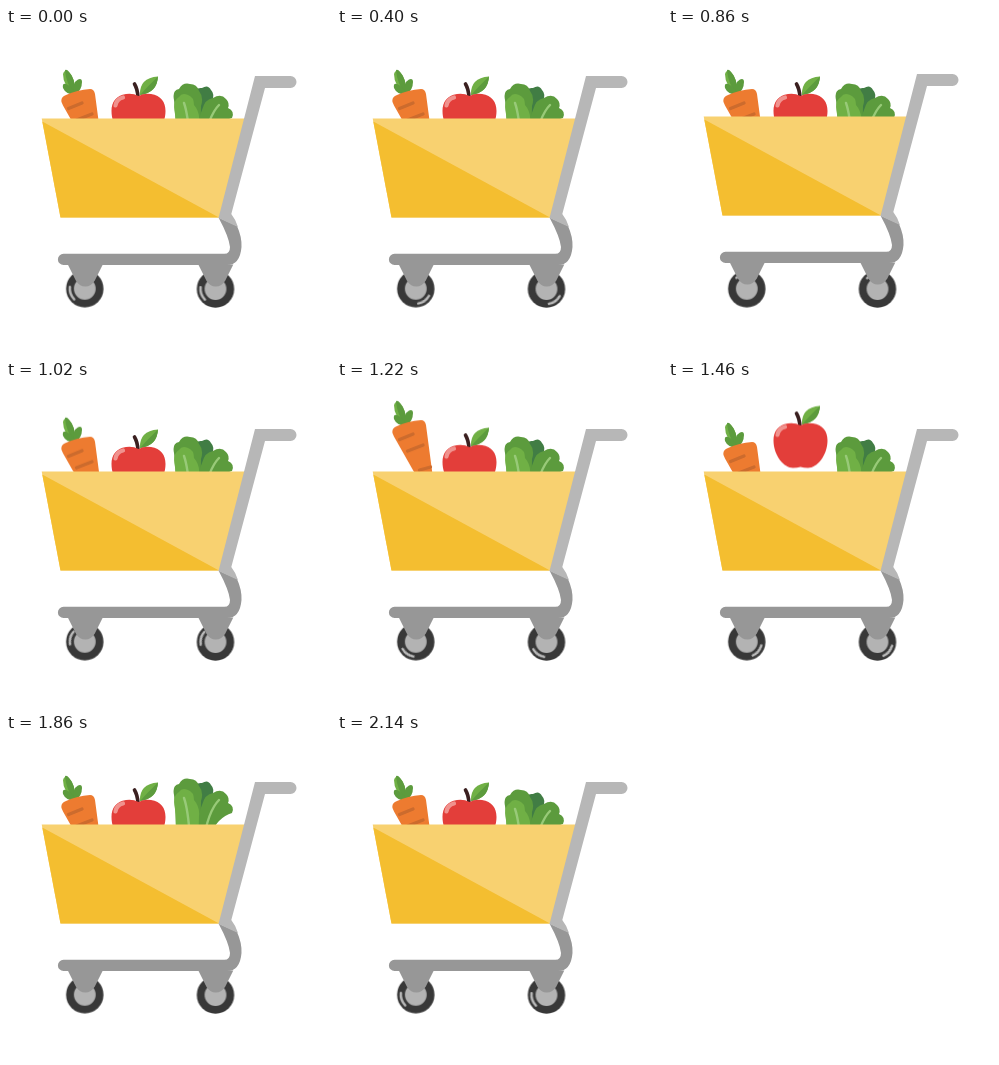
Recreate the animation shown at these times as an HTML page. Size 325 by 325 pixels, loop 2.48 s.

```html
<!DOCTYPE html>
<html lang="en">
<head>
<meta charset="utf-8">
<title>Grocery cart</title>
<style>
html, body { margin: 0; width: 100%; height: 100%; overflow: hidden; background: #fff; }
svg { display: block; width: 100vw; height: 100vh; }
.cart, .carrot, .apple, .lettuce { animation: 2480ms cubic-bezier(.37, 0, .63, 1) infinite; }
.cart { animation-name: bump; }
.carrot { animation-name: carrot; }
.apple { animation-name: apple; }
.lettuce { animation-name: lettuce; }
.spin { animation: spin 2480ms linear infinite; }
.light { fill: #70b045; }
.mid { fill: #5c9b3d; }
.dark { fill: #417d44; }
.line { fill: none; stroke-linecap: round; }
.vein { stroke: #98ca78; stroke-width: 2.4; }
.shine { stroke: #b9b9b9; stroke-width: 2.5; }
@keyframes bump {
  0%, 29.8%, 39.5%, 100% { transform: none; }
  34.7% { transform: translateY(-2px); }
}
@keyframes carrot {
  0%, 38.8%, 55%, 100% { transform: none; }
  46.9% { transform: translateY(-27px); }
}
@keyframes apple {
  0%, 48%, 64.1%, 100% { transform: none; }
  56% { transform: translateY(-33px); }
}
@keyframes lettuce {
  0%, 62.4%, 78.5%, 100% { transform: none; }
  70.5% { transform: translateY(-28px); }
}
/* speeds up briefly, then two even turns */
@keyframes spin {
  0% { transform: rotate(0deg); animation-timing-function: cubic-bezier(.33, 0, .67, .33); }
  8.06% { transform: rotate(-35.3deg); }
  86.29%, 100% { transform: rotate(-720deg); }
}
</style>
</head>
<body>
<svg viewBox="0 0 325 325">
  <defs>
    <g id="wheel">
      <circle r="18.7" fill="#383838"/>
      <circle r="10.9" fill="#b3b3b3"/>
    </g>
    <path id="shine" class="line shine" d="M-14.9 -1.8A15 15 0 0 0 -10.6 10.6"/>
    <path id="fork" d="M-17.500 -25H17.500L9.500 -9Q6 -3 0 -3Q-6 -3 -9.500 -9Z" fill="#979797"/>
  </defs>

  <g class="carrot">
    <path class="light" d="M69 67Q57 58 57 46Q59 40 63 44Q70 51 69 67Z"/>
    <path class="mid" d="M69 67Q60 56 59 42Q61 41 63 44Q70 51 69 67Z"/>
    <path class="mid" d="M69 67Q65 55 72 51.500Q76 50 76 54Q76 62 69 67Z"/>
    <path class="mid" d="M70 67Q60 67 57 60Q56 55 60 56Q67 59 70 67Z"/>
    <path d="M55.500 74Q54.500 69 60 67Q71 62 84 61Q88 61 89 66L98 134Q98 140 89 134L57 77.500Z" fill="#ed7b30"/>
    <path class="line" d="M62.500 80.500L76 75M70.500 92L86 86M82.500 111L93.500 108" stroke="#cc6b2d" stroke-width="3.3"/>
  </g>

  <g class="apple">
    <path class="line" d="M132 69Q131.500 61 128.500 56" stroke="#3b2020" stroke-width="3.600"/>
    <path class="light" d="M134 67Q133 50 152 48.500Q151 65 134 67Z"/>
    <path class="mid" d="M134 67Q142 58 152 48.500Q151 65 134 67Z"/>
    <path d="M132.500 68Q138 65 145 66C155 67.500 159.500 74 159.500 83C159.500 98 149 110.500 140 110.500Q136 110.500 132.500 109.500Q129 110.500 125 110.500C116 110.500 105.500 98 105.500 83C105.500 74 110 67.500 120 66Q127 65 132.500 68Z" fill="#e33e3a"/>
    <path class="line" d="M109.500 77.500Q110.500 71 117 69.500" stroke="#f0928e" stroke-width="4.200"/>
  </g>

  <g class="lettuce">
    <path class="dark" d="M186 68Q189 59 196 60Q202 56 205 62Q209 66 206 73L198 115H186Z"/>
    <path class="mid" d="M172 110L168 72Q166 62 173 61Q177 54 184 56Q191 56 193 63Q198 69 195 78L194 125H172Z"/>
    <path class="mid" d="M184 130Q188 100 196 82Q199 71 207 70Q215 65 220 71Q224 75 222 80Q229 83 226 90Q219 92 213 98Q204 107 201 130Z"/>
    <path class="light" d="M171 130L169 86Q166 73 173 69Q176 64 182 67Q188 69 188 77Q194 84 193 93L192 130Z"/>
    <path class="line vein" d="M178 75Q182 86 184 115M213 77Q202 88 197 120"/>
  </g>

  <g transform="translate(78.800 260.700)">
    <use href="#wheel"/>
    <g class="spin"><use href="#shine"/></g>
  </g>
  <g transform="translate(209.500 261)">
    <use href="#wheel"/>
    <g class="spin"><use href="#shine"/></g>
  </g>

  <g class="cart">
    <use href="#fork" x="79.300" y="261.500"/>
    <use href="#fork" x="209.800" y="261.500"/>
    <path d="M35.700 90.600H239L213.500 189.600H54.500Z" fill="#f8d170"/>
    <path d="M36.300 93.500L213 189.600H54.500Z" fill="#f4be30"/>
    <path d="M212.500 189.500L231 198Q236 209 235.500 219Q234 237 221 237H57.500a5.500 5.500 0 0 1 0-11.200H218Q224 226 224 219Q223 209 212.500 189.500Z" fill="#979797"/>
    <path d="M249 48H284.500a6 6 0 0 1 0 12H259L225.300 186Q230 192 232 199L212.500 190Z" fill="#b7b7b7"/>
  </g>
</svg>
</body>
</html>
```
